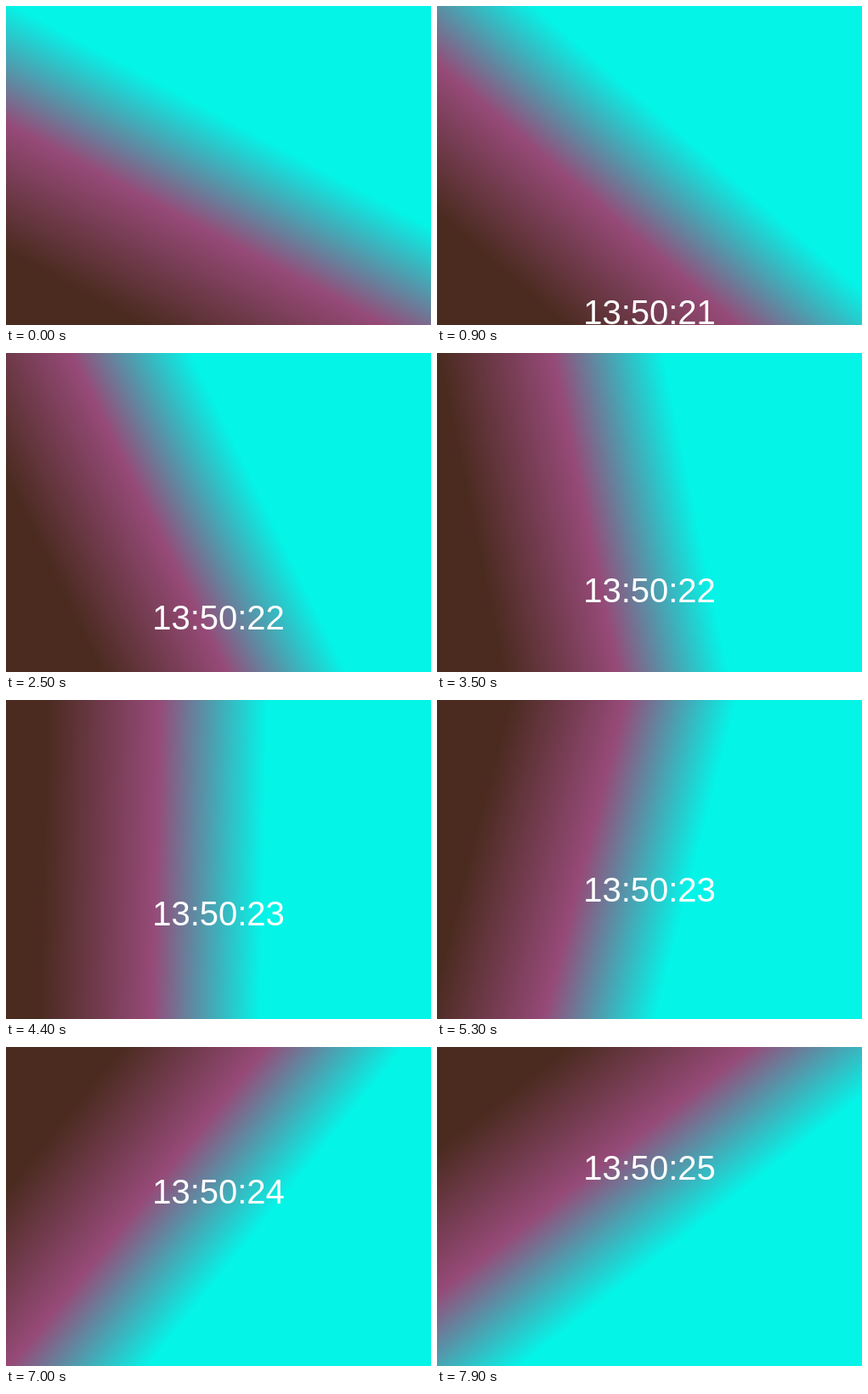
An HTML page with a canvas that plays this animation: 500 by 375 pixels, repeating every 8000 ms.

```html
<!DOCTYPE html>
<html lang="en">
<head>
<meta charset="utf-8">
<title>Turning gradient clock</title>
<style>
  html, body { margin: 0; width: 100%; height: 100%; overflow: hidden; }
  canvas { display: block; }
</style>
</head>
<body>
<canvas width="500" height="375"></canvas>
<script>
const W = 500, H = 375, LOOP = 8000, STEP = 100;
const ctx = document.querySelector('canvas').getContext('2d');

// Distances of the colour bands from the centre, along the gradient axis
const DARK = -205, PINK = -74, CYAN = 53;

function fillGradient(t) {
  const angle = (-62 + 14.4 * t) * Math.PI / 180;
  const at = d => [W / 2 + d * Math.cos(angle), H / 2 + d * Math.sin(angle)];
  const g = ctx.createLinearGradient(...at(DARK), ...at(CYAN));
  g.addColorStop(0, '#4b2b20');
  g.addColorStop((PINK - DARK) / (CYAN - DARK), '#964a78');
  g.addColorStop(1, '#04f4e8');
  ctx.fillStyle = g;
  ctx.fillRect(0, 0, W, H);
}

function drawClock(t) {
  const seconds = 22 + Math.floor((t - 2.15) / 1.8);
  ctx.font = '40px "Liberation Sans", Arial, sans-serif';
  ctx.textAlign = 'center';
  ctx.fillStyle = '#fff';
  ctx.fillText('13:50:' + seconds, W / 2, 402.5 - 31.2 * t);
}

function frame(now) {
  const t = Math.floor(now % LOOP / STEP) * STEP / 1000;
  fillGradient(t);
  drawClock(t);
  requestAnimationFrame(frame);
}
requestAnimationFrame(frame);
</script>
</body>
</html>
```
